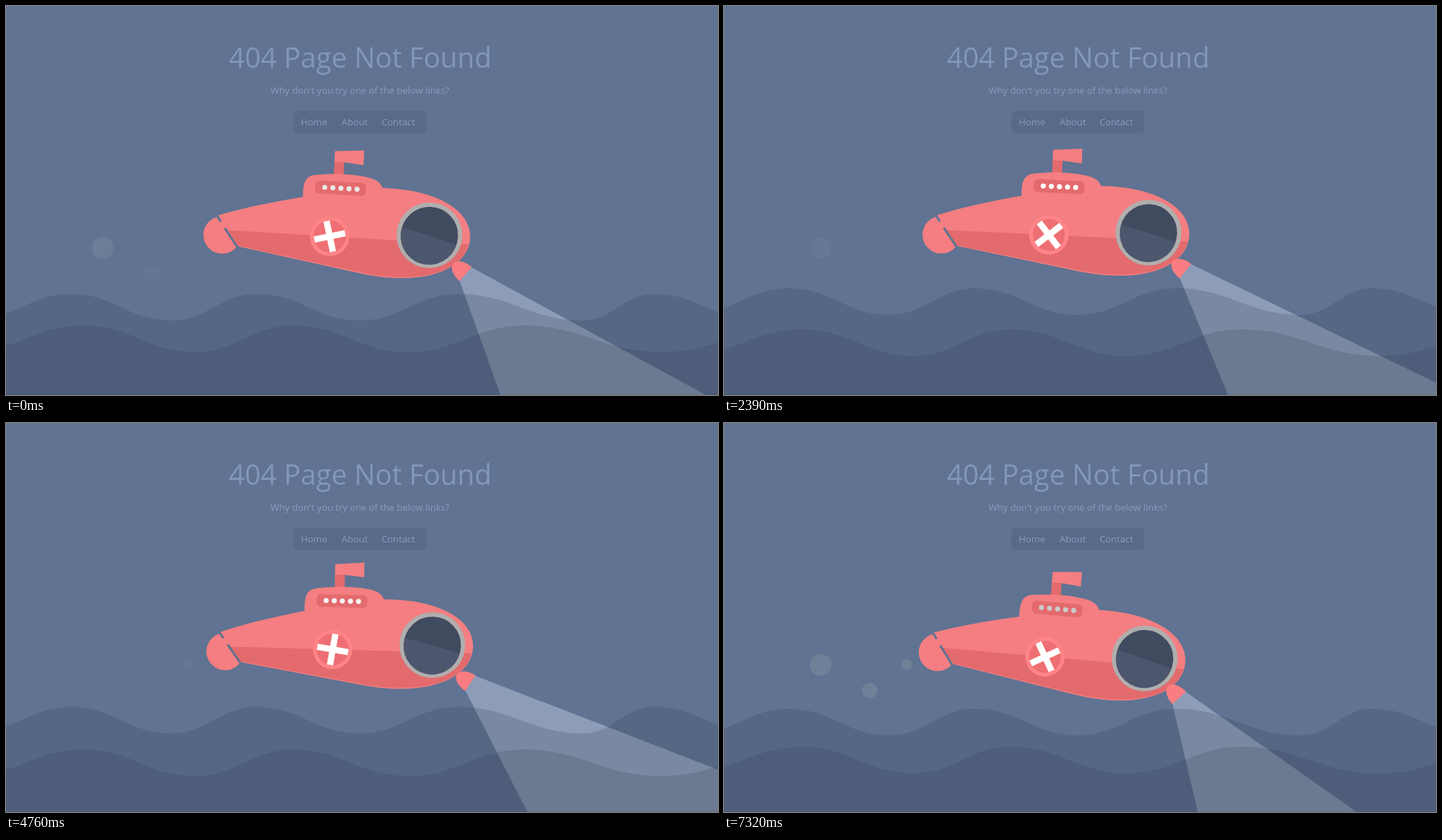
These frames come from a looping animation (1012x554 px, 7.46 s). An HTML page:

```html
<!DOCTYPE html>
<html lang="en">
<head>
<meta charset="utf-8">
<title>404 Page Not Found</title>
<style>
html, body { margin: 0; height: 100%; overflow: hidden; background: #607392; }
svg { display: block; width: 100vw; height: 100vh; }
text { font: 13.3px "Open Sans", "Noto Sans", sans-serif; fill: #8a9cbd; }
#title { font-size: 39.6px; font-weight: 500; fill: #8297ba; }
.mid { text-anchor: middle; }
.red { fill: #f47e81; }
.dark { fill: #e36a6d; }
.wave { fill: rgb(46, 55, 76); fill-opacity: .2; }
</style>
</head>
<body>
<svg viewBox="0 0 1012 554">
  <text id="title" class="mid" x="503.5" y="88">404 Page Not Found</text>
  <text class="mid" x="503" y="125">Why don't you try one of the below links?</text>
  <rect x="408.5" y="149" width="189" height="32" rx="7" fill="#576a89"/>
  <text x="419" y="170">Home</text>
  <text x="477" y="170">About</text>
  <text x="533.7" y="170">Contact</text>

  <g id="bubbles" fill="#c0cec0">
    <circle cx="137.5" cy="344.5" r="15.5"/>
    <circle cx="207" cy="381" r="11"/>
    <circle cx="260" cy="344" r="8"/>
  </g>

  <g id="sub">
    <!-- tail and hull -->
    <circle class="red" cx="313.7" cy="325" r="26.7"/>
    <path class="red" d="M306 297.500C345 284 385 274 427 265C465 254 500 247 545 247C620 247 666 275 666 312C666 345 630 374 560 374C535 374 515 370.500 495 367L337 340Z"/>
    <path class="dark" d="M319 318L664 321.500C658 350 625 372.500 560 372.500C535 372.500 515 369 495 365.500L336 338.800Z"/>
    <path d="M304 296.500L311 306M317 315L336.500 342" stroke="#607392" stroke-width="3.200"/>
    <!-- tower -->
    <path class="dark" d="M468 212H482V232H468Z"/>
    <path class="red" d="M468 198L509.500 195V216L482 213H468Z"/>
    <path class="red" d="M426 268C424 245 428 235 442 233C470 229 495 229 516 233C530 235 537 241 539 250V264Z"/>
    <g transform="rotate(.6 478.500 250)">
      <rect class="dark" x="442.500" y="241" width="72" height="18.500" rx="6"/>
      <path id="lights" d="M456 250.300h.01m11.500 0h.01m11.500 0h.01m11.500 0h.01m11.500 0h.01" stroke-width="7.200" stroke-linecap="round"/>
    </g>
    <!-- badge -->
    <circle cx="466.500" cy="319.500" r="28" fill="#ff8488"/>
    <circle cx="466.500" cy="319.500" r="22.800" fill="#ee6f73"/>
    <path id="cross" d="M-22.300 0H22.300M0 -22.300V22.300" stroke="#fff" stroke-width="9"/>
    <!-- porthole -->
    <circle cx="608" cy="311" r="43.600" fill="#414b5f" stroke="#b0aeae" stroke-width="6"/>
    <path d="M568.600 301.300A40.600 40.600 0 1 0 647.100 322Z" fill="#4c566d"/>
    <!-- lamp -->
    <g id="lamp">
      <path d="M669.500 353.500L1528.600 622L1119 1148L657 375.500Z" fill="#8d9db8"/>
      <path d="M670 353A23 13.200 29 0 0 657 376Z" fill="#fa7d81"/>
    </g>
  </g>

  <path id="back" class="wave"/>
  <path id="front" class="wave"/>
  <rect y="553" width="1012" height="1" fill="#2e374c" opacity=".15"/>
</svg>
<script>
const LOOP = 7460;
// Moments at which the picture steps; longer gaps are split evenly.
const STEPS = [0, 90, 1080, 1260, 1760, 1940, 2240, 2390, 3040, 3220, 3360, 3510, 4140,
  4280, 4430, 4580, 5540, 5710, 6520, 6700, 6850, 7320, LOOP];
// Rise start, rise end, fall start, fall end of each bubble within 2 s.
const FADES = [[1020, 1330, 1700, 2800], [700, 1020, 1650, 2130], [650, 980, 1440, 1840]];

const $ = id => document.getElementById(id);
const mod = (a, b) => (a % b + b) % b;
const clamp = v => Math.max(0, Math.min(1, v));
const tri = (t, period) => 1 - Math.abs(1 - 2 * mod(t, period) / period);

// Smooth curve through alternating troughs and crests, closed below the stage.
function wave(xs) {
  let d = `M${xs[0]} 38`;
  for (let i = 1; i < xs.length; i++) {
    const bend = (xs[i] - xs[i - 1]) * .42, from = i % 2 ? 38 : 0, to = 38 - from;
    d += `C${xs[i - 1] + bend} ${from} ${xs[i] - bend} ${to} ${xs[i]} ${to}`;
  }
  return d + `V200H${xs[0]}Z`;
}
$('back').setAttribute('d', wave([-50, 93, 234, 357, 502, 643, 820, 921, 1070]));
$('front').setAttribute('d', wave([-56, 111, 269, 408, 572, 736, 930, 1125]));

function hold(t) {
  const i = STEPS.findIndex(s => s > t), a = STEPS[i - 1], gap = STEPS[i] - a;
  const step = gap / Math.max(1, Math.round(gap / 163));
  return a + Math.floor((t - a) / step) * step;
}

const move = (id, value) => $(id).setAttribute('transform', value);

function draw(t) {
  const tilt = 5 * tri(t - 1333, 4000) - .52;
  move('sub', `rotate(${tilt} 288 194)`);
  move('lamp', `rotate(${3 * tilt} 669 354)`);
  move('cross', `translate(466.5 319.5) rotate(${.4037 * t - 14.5})`);
  move('back', `translate(0 ${411.4 - 13.5 * tri(t - 320, 6000)})`);
  move('front', `translate(0 ${452.1 + 13.5 * tri(t - 320, 3000)})`);

  const glow = Math.round(228 + 27 * Math.cos((t - 450) * Math.PI / 1000));
  $('lights').setAttribute('stroke', `rgb(${glow},${glow},${glow})`);

  FADES.forEach(([a, b, c, d], i) => {
    const p = a + mod(t - a, 2000);
    const level = Math.min(clamp((p - a) / (b - a)), clamp((d - p) / (d - c)));
    $('bubbles').children[i].setAttribute('opacity', .16 * level);
  });
}

function tick() {
  draw(hold(performance.now() % LOOP));
  requestAnimationFrame(tick);
}
tick();
</script>
</body>
</html>
```
